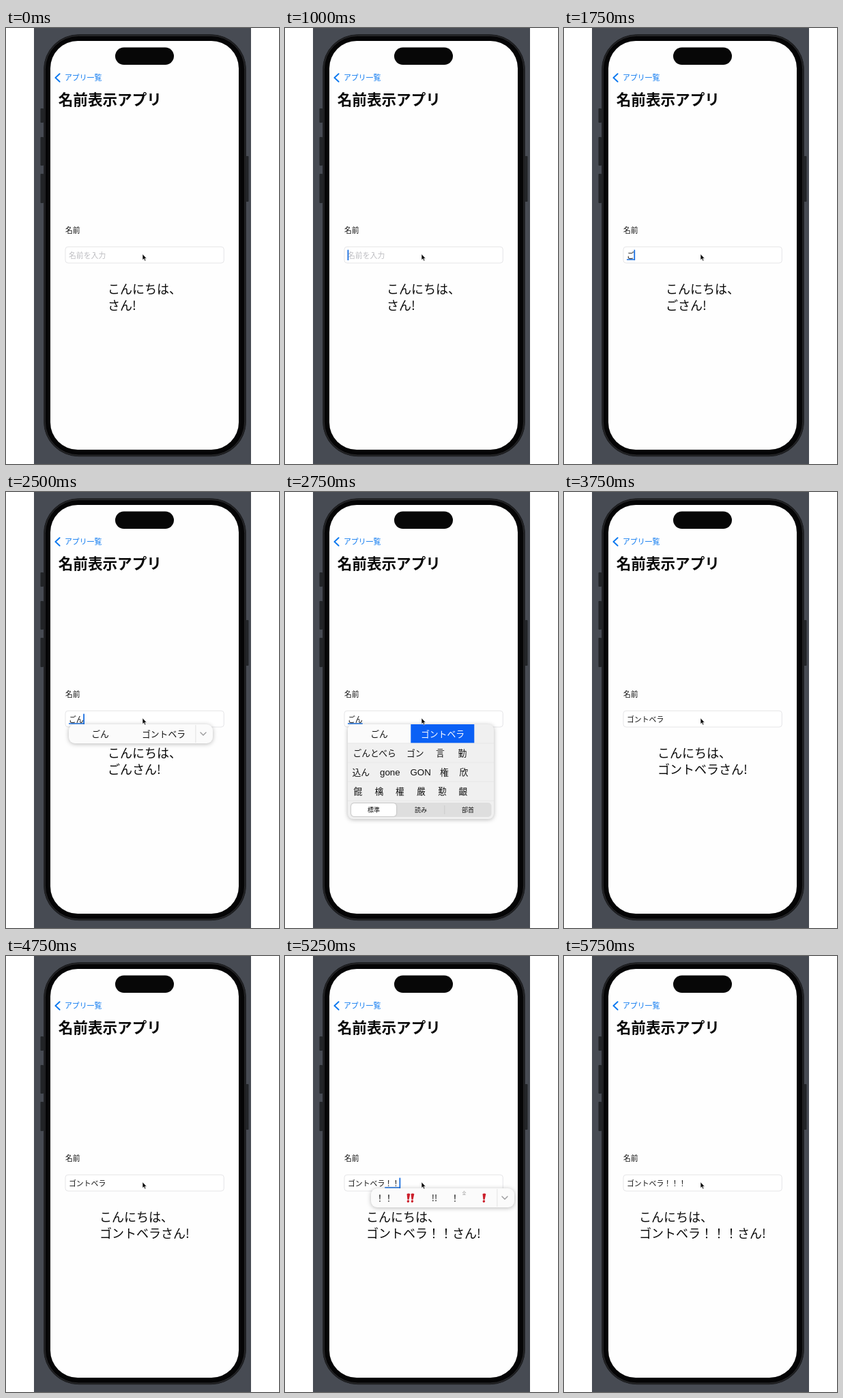
An HTML page that plays this animation: 400 px wide and 640 px high, repeating every 6000 ms.

```html
<!DOCTYPE html>
<html lang="ja">
<head>
<meta charset="utf-8">
<title>名前表示アプリ</title>
<style>
html, body { margin: 0; width: 100%; height: 100%; overflow: hidden; background: #fff; }
svg { display: block; width: 100vw; height: 100vh; }
text { font-family: "Noto Sans CJK JP", "Noto Sans CJK", sans-serif; white-space: pre; }
.mid { text-anchor: middle; }
.shadow { filter: drop-shadow(0 1px 3px rgba(0, 0, 0, .28)); }
</style>
</head>
<body>
<svg id="stage" viewBox="0 0 400 640"></svg>
<script>
const LOOP = 6000, STEP = 250;
const NAME = 'ゴントベラ', KANA = 'ごんとべら';
const CHAR = 10.85, FIELD_X = 92;
const BLUE = '#1a6fe0';

const rect = (x, y, w, h, fill, r = 0, extra = '') =>
  `<rect x="${x}" y="${y}" width="${w}" height="${h}" rx="${r}" fill="${fill}" ${extra}/>`;
// y is the optical centre of the line
const text = (s, x, y, size, fill = '#111', extra = '') =>
  `<text x="${x}" y="${(y + size * .38).toFixed(2)}" font-size="${size}" fill="${fill}" ${extra}>${s}</text>`;
const mid = (s, x, y, size, fill, extra = '') => text(s, x, y, size, fill, 'class="mid" ' + extra);
const line = (d, color, w, extra = '') =>
  `<path d="${d}" fill="none" stroke="${color}" stroke-width="${w}" ${extra}/>`;

function phone() {
  const buttons = [[50.5, 118, 21], [50.5, 160, 42], [50.5, 214, 43], [351, 188, 67]];
  return rect(41, 0, 318, 640, '#474b53') +
    buttons.map(([x, y, h]) => rect(x, y, 4.5, h, '#222427', 1)).join('') +
    rect(55.5, 9.7, 296, 619, '#17181a', 51, 'stroke="#222326" stroke-width="1"') +
    rect(57.3, 11.5, 292.4, 615.4, '#050506', 49, 'stroke="#3b3c3e" stroke-width=".7"') +
    rect(65, 19, 276, 600, '#fefefe', 40) +
    rect(160, 28.5, 86, 25.5, '#070707', 12.75);
}

function page() {
  return line('M78.6 67.2L72.4 73l6.2 5.8', '#0a78f0', 1.9, 'stroke-linecap="round" stroke-linejoin="round"') +
    text('アプリ一覧', 86, 73, 10.85, '#0a78f0') +
    text('名前表示アプリ', 76.7, 104.5, 21.6, '#080808', 'font-weight="700"') +
    text('名前', 87, 296.5, 10.85) +
    rect(87, 321.2, 232.3, 23.8, '#fff', 4, 'stroke="#dfdfe1" stroke-width=".8"');
}

function field({ value, marked = 0, caret }) {
  const end = FIELD_X + value.length * CHAR;
  let out = value ? text(value, FIELD_X, 333.4, CHAR) : text('名前を入力', FIELD_X, 333.4, CHAR, '#bdbdc1');
  if (marked) out += rect(end - marked * CHAR, 339.2, marked * CHAR, 1.5, BLUE);
  if (caret) out += rect(end - .5, 325.5, 1.8, 15.5, BLUE, .6);
  return out;
}

function greeting(value) {
  const width = Math.max(6, value.length + 2.33) * 18;
  const x = 203 - width / 2;
  return text('こんにちは、', x, 383.5, 18, '#0a0a0a') + text(value + 'さん!', x, 407, 18, '#0a0a0a');
}

const bar = (x, w) => `<g class="shadow">${rect(x, 341, w, 28, '#fbfbfb', 9)}</g>` +
  rect(x + w - 25.5, 342, .8, 26, '#dcdcdc') +
  line(`M${x + w - 18} 353l4 4 4-4`, '#9a9a9c', 1.4, 'stroke-linecap="round" stroke-linejoin="round"');

const redMark = x => `<g fill="#cc1f2b" transform="translate(${x} 348.5) skewX(-3)">` +
  '<path d="M-2.4 .8q2.4-1.6 4.8 0L1.1 9h-2.2z"/><circle cy="11.6" r="1.8"/></g>';

const nameBar = () => bar(92, 211) + mid('ごん', 138, 355, 12.8) + mid(NAME, 231, 355, 12.8);

const markBar = first => bar(126, 210) + text(first, 132.5, 355, 13) +
  redMark(181) + redMark(187) +
  mid('!!', 219, 355, 13) + mid('！', 249, 355, 13) +
  mid('全', 262.5, 348, 6, '#999') + redMark(292);

function candidates() {
  const rows = [
    [[KANA, 99.5], ['ゴン', 178], ['言', 221], ['勤', 253.5]],
    [['込ん', 98.5], ['gone', 139], ['GON', 183.5], ['権', 227], ['欣', 255.5]],
    [['餛', 100.5], ['檎', 131.5], ['權', 162], ['嚴', 193], ['懃', 224], ['齦', 254.5]]
  ];
  let out = `<g class="shadow">${rect(92, 341, 214, 139, '#f0f0f0', 8)}</g>` +
    '<path d="M92 368.5V349a8 8 0 0 1 8-8H277v27.5z" fill="#fbfbfb"/>' +
    rect(184.3, 341, 93, 27.5, '#0a60f5') +
    mid('ごん', 138, 354.8, 12.8) + mid(NAME, 231, 354.8, 12.8, '#fff');
  rows.forEach((row, i) => {
    const y = 383 + 28.1 * i;
    out += rect(92, y - 14.4, 214, .6, '#e2e2e2');
    for (const [s, x] of row) {
      const latin = /[a-z]/i.test(s) ? 'style="font-family:\'Liberation Sans\',sans-serif"' : '';
      out += text(s, x, y, latin ? 13.3 : 12.8, '#111', latin);
    }
  });
  return out + rect(92, 452.8, 214, .6, '#dedede') +
    rect(96, 456, 206.5, 21, '#dedede', 5) +
    `<g style="filter:drop-shadow(0 .5px 1px rgba(0,0,0,.25))">${rect(97, 457, 66, 19, '#fff', 4.5)}</g>` +
    rect(233.5, 460, .7, 13, '#c4c4c4') +
    mid('標準', 130, 466.5, 9) + mid('読み', 199, 466.5, 9) + mid('部首', 268, 466.5, 9);
}

const pointer = '<path d="M200 331.8v8.8l2-1.8 1.4 3.1 1.5-.7-1.4-3h2.6z" fill="#0a0a0a" stroke="#fff" stroke-width=".6"/>';

function stateAt(t) {
  if (t < 1750) return { value: '', caret: t >= 750 && t < 1250 || t >= 1500 };
  if (t < 2000) return { value: 'ご', marked: 1, caret: true };
  if (t < 2750) return { value: 'ごん', marked: 2, caret: true, panel: nameBar };
  if (t < 3000) return { value: 'ごん', marked: 2, panel: candidates };
  if (t < 5000) return { value: NAME, caret: Math.floor(t / STEP) % 2 === 0 };
  if (t < 5250) return { value: NAME + '！', marked: 1, caret: true };
  if (t < 5500) return { value: NAME + '！！', marked: 2, caret: true, panel: () => markBar('！！') };
  if (t < 5750) return { value: NAME + '！！！', marked: 3, caret: true, panel: () => markBar('！！！') };
  return { value: NAME + '！！！' };
}

const stage = document.getElementById('stage');
stage.innerHTML = phone() + page() + '<g id="live"></g>' + pointer;
const live = document.getElementById('live');
const start = performance.now();
let shown = -1;

function draw(now) {
  const step = Math.floor((Math.max(0, now - start) % LOOP) / STEP);
  if (step !== shown) {
    shown = step;
    const s = stateAt(step * STEP);
    live.innerHTML = field(s) + greeting(s.value) + (s.panel ? s.panel() : '');
  }
  requestAnimationFrame(draw);
}
draw(start);
</script>
</body>
</html>
```
